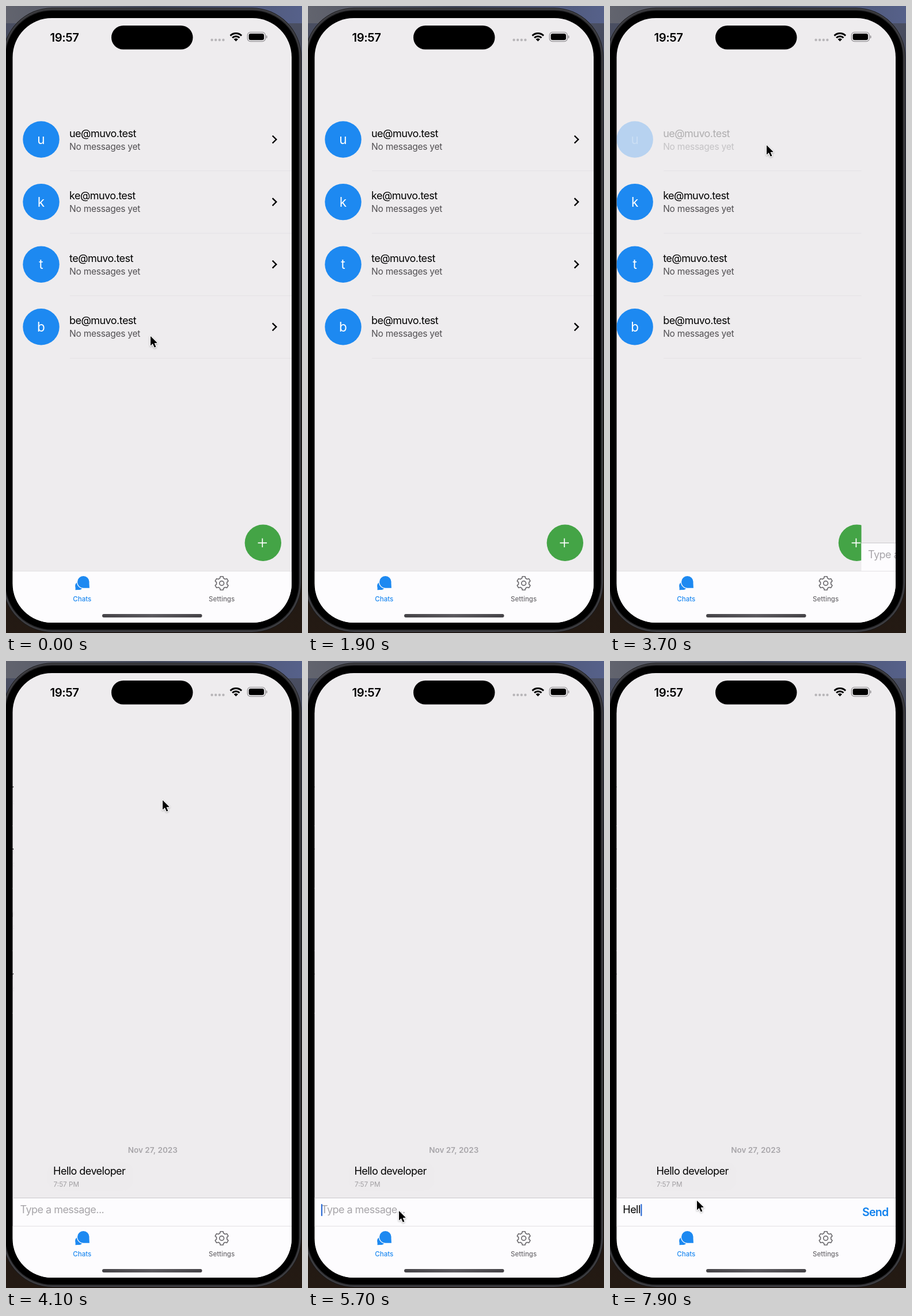
An HTML page with a canvas for the animation above (8000 ms loop, 514 by 1090 pixels).

```html
<!DOCTYPE html>
<html lang="en">
<head>
<meta charset="utf-8">
<title>Chat app</title>
<style>
  html, body { margin: 0; width: 100%; height: 100%; overflow: hidden; background: #000; }
  canvas { display: block; width: 514px; height: 1090px; }
</style>
</head>
<body>
<canvas id="stage" width="514" height="1090"></canvas>
<script>
const ctx = document.getElementById('stage').getContext('2d');
const LOOP = 8000, STEP = 100;
const SCREEN = { x: 11.5, y: 21, w: 484.5, h: 1051, r: 68 };
const RIGHT = SCREEN.x + SCREEN.w;
const TAB_TOP = 983;
const BG = '#eeecee', PANEL = '#fdfcfe', BLUE = '#1d89f1', GRAY = '#a7a5a9';

const CONTACTS = ['ue@muvo.test', 'ke@muvo.test', 'te@muvo.test', 'be@muvo.test'];
const DRAFT = 'Hell';
const KEY_TIMES = [7200, 7400, 7600, 7800];
const FOCUS_TIME = 5500;
const PUSH_TIME = 3667;

// time, x, y of the pointer tip
const POINTER = [
  [0, 251, 574], [900, 251, 574], [1600, 540, 520],
  [2600, 540, 330], [3200, 272, 242], [4500, 272, 242],
  [5300, 158, 956], [6200, 158, 956], [6800, 151, 938], [LOOP, 151, 938]
];

const clamp = v => Math.max(0, Math.min(1, v));
const smooth = v => { v = clamp(v); return v * v * (3 - 2 * v); };
const easeQuad = v => { v = clamp(v); return v < .5 ? 2 * v * v : 1 - 2 * (1 - v) ** 2; };

function text(str, x, y, size, color, { weight = 400, spacing = 0, align = 'left' } = {}) {
  ctx.font = `${weight} ${size}px Inter, sans-serif`;
  ctx.letterSpacing = `${spacing * size}px`;
  ctx.textAlign = align;
  ctx.fillStyle = color;
  ctx.fillText(str, x, y);
}

function rounded(x, y, w, h, r, fill) {
  ctx.beginPath();
  ctx.roundRect(x, y, w, h, r);
  ctx.fillStyle = fill;
  ctx.fill();
}

function rect(x, y, w, h, fill) {
  ctx.fillStyle = fill;
  ctx.fillRect(x, y, w, h);
}

function disc(x, y, r, fill) {
  ctx.beginPath();
  ctx.arc(x, y, r, 0, Math.PI * 2);
  ctx.fillStyle = fill;
  ctx.fill();
}

function polyline(points, color, width) {
  ctx.beginPath();
  points.forEach(([x, y]) => ctx.lineTo(x, y));
  ctx.strokeStyle = color;
  ctx.lineWidth = width;
  ctx.stroke();
}

function gradient(x0, y0, x1, y1, ...colors) {
  const g = ctx.createLinearGradient(x0, y0, x1, y1);
  colors.forEach((c, i) => g.addColorStop(i / (colors.length - 1), c));
  return g;
}

function drawPhone() {
  rect(0, 0, 514, 1090, gradient(0, 0, 0, 1090, '#4d5266', '#25262e', '#171311', '#241a13'));
  rect(0, 0, 514, 30, gradient(0, 0, 514, 0, '#62646e', '#444a5c', '#56618a'));
  rounded(-5.5, 3, 518.5, 1086, 86, '#1b1b1d');
  rounded(-4.5, 4, 516.5, 1084, 85, '#414145');
  rounded(-2.5, 6, 512.5, 1080, 83, '#2a2a2d');
  rounded(-1, 8, 509.5, 1076, 81, '#000');
  rounded(SCREEN.x, SCREEN.y, SCREEN.w, SCREEN.h, SCREEN.r, BG);
}

function drawStatusBar() {
  text('19:57', 76.5, 61.5, 20.3, '#000', { weight: 600, spacing: -.02 });
  rounded(183, 34, 141.5, 41.5, 20.7, '#000');
  for (let i = 0; i < 4; i++) disc(357.6 + i * 6.6, 59, 2.2, '#b8b6b9');

  const cx = 399.3, cy = 61.6, up = -Math.PI / 2;
  ctx.strokeStyle = '#000';
  ctx.lineWidth = 3;
  for (const r of [14, 8.9]) {
    ctx.beginPath();
    ctx.arc(cx, cy, r, up - .77, up + .77);
    ctx.stroke();
  }
  ctx.beginPath();
  ctx.moveTo(cx, cy);
  ctx.arc(cx, cy, 5.4, up - .77, up + .77);
  ctx.fillStyle = '#000';
  ctx.fill();

  ctx.beginPath();
  ctx.roundRect(419.3, 45.6, 31, 16, 5.2);
  ctx.strokeStyle = '#979598';
  ctx.lineWidth = 1.3;
  ctx.stroke();
  rounded(421.6, 47.9, 26.4, 11.4, 3.3, '#000');
  rounded(451.6, 51, 2, 5.4, [0, 2, 2, 0], '#979598');
}

function drawRow(address, index, alpha) {
  const y = 232 + index * 108.6;
  ctx.save();
  ctx.globalAlpha = alpha;
  disc(61, y, 31.7, BLUE);
  text(address[0], 61, y + 8, 22.5, '#fff', { align: 'center' });
  text(address, 110, y - 4.5, 18, '#000', { spacing: -.03 });
  text('No messages yet', 110, y + 17.5, 15.5, '#514f52', { spacing: -.015 });
  ctx.lineJoin = 'miter';
  polyline([[462.7, y - 6.5], [469.3, y], [462.7, y + 6.5]], '#000', 2.4);
  ctx.restore();
  rect(111, y + 54, RIGHT - 111, 1, '#e4e2e5');
}

function drawList(t) {
  const pressed = t < 3650 ? easeQuad((t - 3450) / 150) : 1 - easeQuad((t - 3650) / 250);
  CONTACTS.forEach((c, i) => drawRow(c, i, i ? 1 : 1 - .8 * pressed));
  disc(446.3, 933.3, 31.7, '#44a446');
  polyline([[437.5, 933.3], [453, 933.3]], '#fff', 1.7);
  polyline([[445.25, 925.5], [445.25, 941]], '#fff', 1.7);
}

function drawChat(t) {
  rect(SCREEN.x, SCREEN.y, SCREEN.w, TAB_TOP - SCREEN.y, BG);
  text('Nov 27, 2023', 253.2, 854.6, 13.5, GRAY, { weight: 600, align: 'center' });
  rounded(70.5, 871, 149, 49.5, 18, '#edebed');
  text('Hello developer', 80.5, 893, 18, '#000', { spacing: -.03 });
  text('7:57 PM', 81, 914, 11.7, '#a19fa2');

  rect(SCREEN.x, 933, SCREEN.w, TAB_TOP - 933, PANEL);
  rect(SCREEN.x, 933, SCREEN.w, 1, '#cbc9cc');
  const typed = DRAFT.slice(0, KEY_TIMES.filter(k => t >= k).length);
  if (typed) {
    text(typed, 22.3, 959.8, 18, '#000', { spacing: -.03 });
    text('Send', 438, 965, 19.5, '#0f80ee', { weight: 600, spacing: -.035 });
  } else {
    text('Type a message...', 23, 959.5, 18, GRAY, { spacing: -.03 });
  }

  const blinkOn = (t - FOCUS_TIME) % 1000 < 600;
  if (t >= FOCUS_TIME && (typed || blinkOn)) {
    ctx.font = '400 18px Inter, sans-serif';
    ctx.letterSpacing = '-0.54px';
    const x = typed ? 22.8 + ctx.measureText(typed).width : 22.8;
    rounded(x, 944, 2.2, 21, 1, '#2d6bd3');
  }
}

function drawContent(t) {
  const wt = 18.26 * Math.max(0, t - PUSH_TIME) / 1000;
  const remaining = (1 + wt) * Math.exp(-wt);
  ctx.save();
  ctx.beginPath();
  ctx.rect(SCREEN.x, 90, SCREEN.w, TAB_TOP - 90);
  ctx.clip();
  ctx.save();
  ctx.translate(-.3 * SCREEN.w * (1 - remaining), 0);
  drawList(t);
  ctx.restore();
  if (remaining < 1) {
    ctx.translate(SCREEN.w * remaining, 0);
    drawChat(t);
  }
  ctx.restore();
}

function drawChatIcon() {
  disc(127, 1008, 6.9, BLUE);
  ctx.beginPath();
  ctx.moveTo(120.8, 1005);
  ctx.lineTo(120.5, 1015.3);
  ctx.lineTo(129, 1014.8);
  ctx.fill();
  const bubble = r => {
    ctx.beginPath();
    ctx.arc(134.3, 1001.4, r, 0, Math.PI * 2);
    ctx.moveTo(144.4, 1002);
    ctx.lineTo(144.9, 1011.8);
    ctx.lineTo(134, 1011.4);
    ctx.closePath();
  };
  bubble(10.3);
  ctx.strokeStyle = PANEL;
  ctx.lineWidth = 2.2;
  ctx.lineJoin = 'round';
  ctx.stroke();
  ctx.fillStyle = BLUE;
  ctx.fill();
}

function drawGearIcon() {
  const cx = 374.6, cy = 1003.5;
  ctx.beginPath();
  for (let tooth = 0; tooth < 6; tooth++) {
    const mid = tooth * Math.PI / 3 - Math.PI / 2;
    for (const [offset, r] of [[-.35, 9.2], [-.2, 12], [.2, 12], [.35, 9.2]]) {
      ctx.lineTo(cx + r * Math.cos(mid + offset), cy + r * Math.sin(mid + offset));
    }
  }
  ctx.closePath();
  ctx.strokeStyle = '#6d6b6f';
  ctx.lineWidth = 1.7;
  ctx.lineJoin = 'round';
  ctx.stroke();
  ctx.beginPath();
  ctx.arc(cx, cy, 3.9, 0, Math.PI * 2);
  ctx.stroke();
}

function drawTabBar() {
  ctx.save();
  ctx.beginPath();
  ctx.roundRect(SCREEN.x, SCREEN.y, SCREEN.w, SCREEN.h, SCREEN.r);
  ctx.clip();
  rect(SCREEN.x, TAB_TOP, SCREEN.w, 100, PANEL);
  rect(SCREEN.x, TAB_TOP - 1, SCREEN.w, 1, '#e3e1e4');
  ctx.restore();
  drawChatIcon();
  drawGearIcon();
  text('Chats', 132.3, 1035, 11.5, BLUE, { weight: 500, align: 'center' });
  text('Settings', 374.6, 1035, 11.5, '#6d6b6f', { weight: 500, align: 'center' });
  rounded(167, 1057, 173.5, 6, 3, gradient(167, 0, 340, 0, '#464448', '#5c5a5f', '#464448'));
}

function pointerAt(t) {
  const i = POINTER.findIndex(k => k[0] > t);
  const [t0, x0, y0] = POINTER[i - 1], [t1, x1, y1] = POINTER[i];
  const p = smooth((t - t0) / (t1 - t0));
  return [x0 + (x1 - x0) * p, y0 + (y1 - y0) * p];
}

function drawPointer(t) {
  ctx.save();
  ctx.translate(...pointerAt(t));
  ctx.beginPath();
  [[0, 0], [0, 16.6], [3.8, 13], [6.7, 19.6], [9.4, 18.4], [6.6, 12], [11.8, 11.8]]
    .forEach(([x, y]) => ctx.lineTo(x, y));
  ctx.closePath();
  ctx.lineJoin = 'round';
  ctx.shadowColor = 'rgba(0,0,0,.3)';
  ctx.shadowBlur = 3;
  ctx.shadowOffsetY = 1;
  ctx.strokeStyle = '#fff';
  ctx.lineWidth = 2.4;
  ctx.stroke();
  ctx.shadowColor = 'transparent';
  ctx.fillStyle = '#000';
  ctx.fill();
  ctx.restore();
}

function render(now) {
  const t = Math.floor((now % LOOP) / STEP) * STEP;
  drawPhone();
  drawContent(t);
  drawStatusBar();
  drawTabBar();
  drawPointer(t);
}

const start = performance.now();
function tick() {
  render(performance.now() - start);
  requestAnimationFrame(tick);
}
tick();
</script>
</body>
</html>
```
